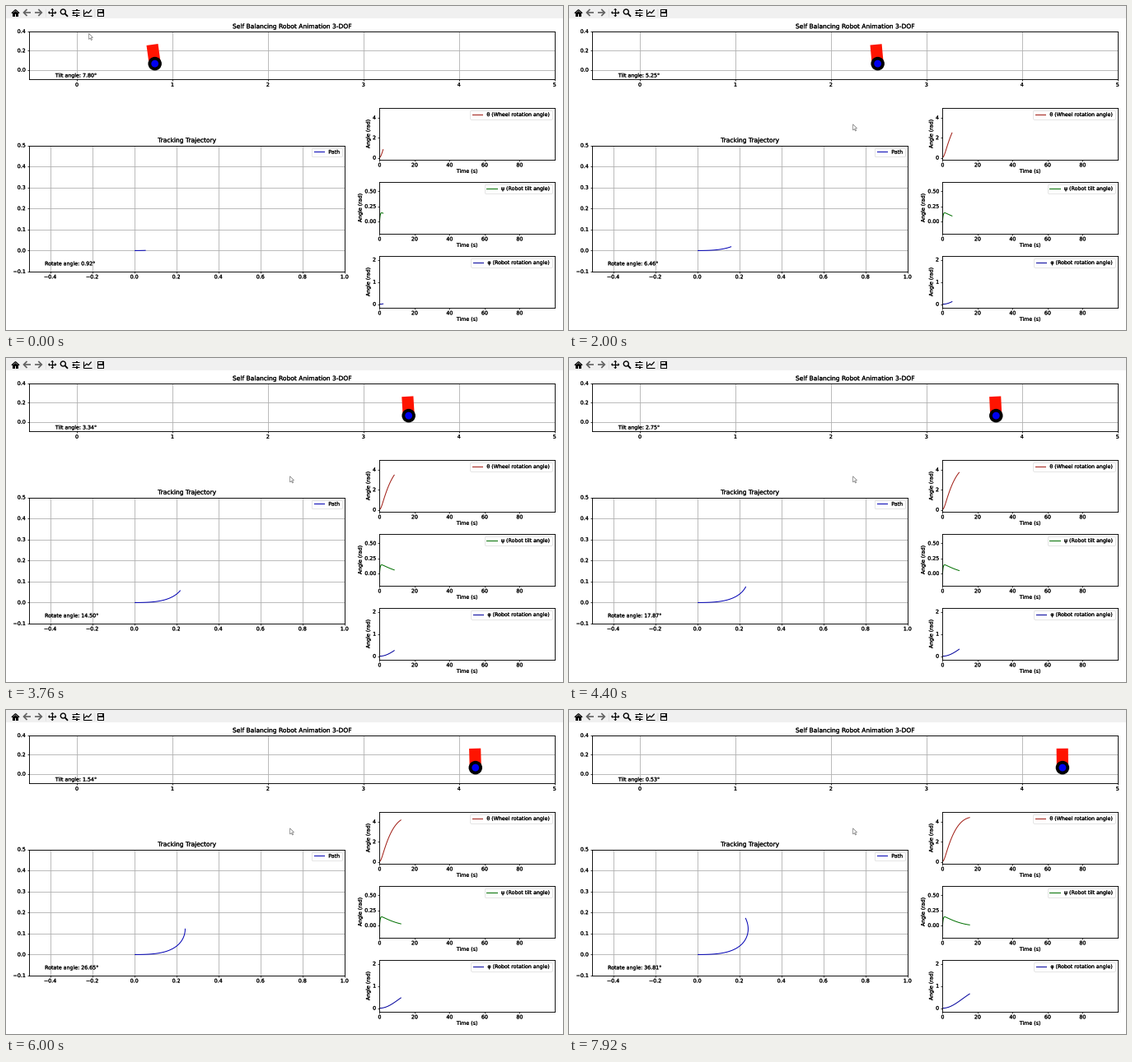
These frames come from a looping animation (676x394 px, 8 s). A matplotlib script:

```python
import numpy as np
import matplotlib.pyplot as plt
from matplotlib.animation import FuncAnimation
from matplotlib.patches import Circle, Polygon, Rectangle
from matplotlib.patheffects import withStroke
from matplotlib.text import Text

W, H = 676, 394
FRAMES, INTERVAL = 100, 80
SCALE = 0.452  # shrinks the default matplotlib style to the stage
WHEEL_R = 0.065
BODY_W, BODY_H = 0.122, 0.2

plt.rcParams.update({
    "font.family": "DejaVu Sans",
    "font.size": 10 * SCALE,
    "axes.titlesize": 12 * SCALE,
    "axes.titlepad": 6 * SCALE,
    "axes.labelpad": 4 * SCALE,
    "axes.linewidth": 0.65,
    "grid.linewidth": 0.6,
    "lines.linewidth": 0.72,
    "patch.linewidth": SCALE,
    "legend.fontsize": 10 * SCALE,
    "toolbar": "None",
})
for axis in ("xtick", "ytick"):
    plt.rcParams.update({
        f"{axis}.major.size": 3.5 * SCALE,
        f"{axis}.major.width": 0.55,
        f"{axis}.major.pad": 3.5 * SCALE,
    })

fig = plt.figure(figsize=(W / 100, H / 100), dpi=100, facecolor="white")


# --- motion -----------------------------------------------------------------
T0, DT = 2.0, 0.1357       # plot time at the loop start and per frame
DECAY, OMEGA = 0.0138, 0.01313  # damped swing, per frame

LEAD = 15                  # samples drawn before the loop starts
step = np.concatenate([np.linspace(-T0 / DT, 0, LEAD, endpoint=False),
                       np.arange(FRAMES)])
time = T0 + DT * step
damp = np.exp(-DECAY * step)
cos, sin = np.cos(OMEGA * step), np.sin(OMEGA * step)

# The wheel speed follows the tilt, so theta uses the integral of the swing.
travel = (DECAY + damp * (OMEGA * sin - DECAY * cos)) / (DECAY**2 + OMEGA**2)
tilt = 7.825 * damp * cos * (1 - np.exp(-time / 0.35))
theta = 0.78 + 0.0822 * travel + 0.64 * np.exp(-time / 0.7)
turn = 0.232 * time**2 / (1 + 0.215 * (time / 10.68)**2.3)

path_x = WHEEL_R * theta * np.cos(np.radians(turn))
path_y = WHEEL_R * theta * np.sin(np.radians(turn))


# --- plots ------------------------------------------------------------------
def pixel_axes(left, top, right, bottom, xlim, ylim):
    ax = fig.add_axes([left / W, 1 - bottom / H,
                       (right - left) / W, (bottom - top) / H])
    ax.set(xlim=xlim, ylim=ylim)
    return ax


def angle_plot(top, ylim, yticks, color, label):
    ax = pixel_axes(453.4, top, 665.7, top + 63, (0, 100), ylim)
    ax.set(xticks=range(0, 81, 20), yticks=yticks,
           xlabel="Time (s)", ylabel="Angle (rad)")
    line, = ax.plot([], [], color=color, label=label)
    ax.legend(loc="upper right")
    return line


side = pixel_axes(28, 31, 665.7, 89.4, (-0.5, 5), (-0.1, 0.4))
side.set(xticks=range(6), yticks=[0, 0.2, 0.4],
         title="Self Balancing Robot Animation 3-DOF")
side.grid(True)
tilt_text = side.text(0.05, 0.05, "", transform=side.transAxes)

body = Polygon(np.zeros((4, 2)), color="#ff1400", lw=0, zorder=3)
tire = Circle((0, WHEEL_R), 0.071, color="black", lw=0, zorder=4)
hub = Circle((0, WHEEL_R), 0.038, color="#0000f0", lw=0, zorder=5)
for part in (body, tire, hub):
    side.add_patch(part)

track = pixel_axes(28, 169.5, 410.7, 323, (-0.5, 1), (-0.1, 0.5))
track.set(xticks=np.arange(-4, 11, 2) / 10, yticks=np.arange(-1, 6) / 10,
          title="Tracking Trajectory")
track.grid(True)
path_line, = track.plot([], [], color="#0000b4", label="Path")
track.legend(loc="upper right")
turn_text = track.text(0.05, 0.05, "", transform=track.transAxes)

theta_line = angle_plot(124, (-0.2, 4.98), [0, 2, 4], "#a01c14",
                        "θ (Wheel rotation angle)")
tilt_line = angle_plot(214, (-0.205, 0.656), [0, 0.25, 0.5], "#007000",
                       "ψ (Robot tilt angle)")
turn_line = angle_plot(304, (-0.163, 2.167), [0, 1, 2], "#00009c",
                       "φ (Robot rotation angle)")

# Outline rendering keeps the small text at its exact subpixel size.
for text in fig.findobj(Text):
    text.set_path_effects([withStroke(linewidth=0.12, foreground="black")])


# --- toolbar and pointer ----------------------------------------------------
screen = fig.add_axes([0, 0, 1, 1], zorder=10)
screen.set(xlim=(0, W), ylim=(H, 0))
screen.axis("off")


def stroke(points, color="black", lw=0.9):
    screen.plot(*zip(*points), color=color, lw=lw,
                solid_capstyle="butt", solid_joinstyle="miter")


def fill(points, color="black"):
    screen.add_patch(Polygon(points, color=color, lw=0, zorder=2))


def box(x, y, w, h, color="black"):
    screen.add_patch(Rectangle((x, y), w, h, color=color, lw=0, zorder=2))


def draw_toolbar():
    box(0, 0, W, 15, "#f0f0f0")
    # home
    stroke([(6.8, 8.8), (11.5, 4.6), (16.2, 8.8)])
    box(8.2, 8, 2.4, 4.6)
    box(12.4, 8, 2.4, 4.6)
    fill([(8.2, 9.8), (8.2, 8.9), (11.5, 6), (14.8, 8.9), (14.8, 9.8)])
    # back and forward
    for x, d in ((25.5, -1), (39.3, 1)):
        stroke([(x - 4.2 * d, 8), (x + 3.6 * d, 8)], "#606060", 1.2)
        stroke([(x, 4), (x + 4 * d, 8), (x, 12)], "#606060", 1.2)
    # pan
    stroke([(52, 8), (60.4, 8)])
    stroke([(56.2, 3.8), (56.2, 12.2)])
    for dx, dy in ((1, 0), (-1, 0), (0, 1), (0, -1)):
        x, y = 56.2 + 3.2 * dx, 8 + 3.2 * dy
        fill([(x + 2 * dx, y + 2 * dy), (x + 2 * dy, y + 2 * dx),
              (x - 2 * dy, y - 2 * dx)])
    # zoom
    screen.add_patch(Circle((69.3, 7), 3, fill=False, ec="black", lw=1,
                            zorder=2))
    stroke([(71.4, 9.1), (75, 12.8)], lw=1.3)
    # sliders
    for y, knob in ((5, 86), (8.2, 82), (11.4, 86)):
        stroke([(79.8, y), (89, y)], lw=0.7)
        box(knob - 0.8, y - 1.4, 1.6, 2.8)
    # chart
    stroke([(94.2, 3.8), (94.2, 12.2), (104, 12.2)], lw=0.8)
    stroke([(95.2, 10), (98, 7), (100, 8.8), (103.6, 4.6)])
    # save
    box(110.8, 4, 8.6, 8.6)
    box(112, 5, 4.8, 2.1, "#f0f0f0")
    box(112.2, 8.6, 5.8, 3.1, "#f0f0f0")
    for x in (47.5, 107):
        stroke([(x, 3), (x, 13)], "#dcdcdc", 0.5)


draw_toolbar()
ARROW = np.array([(0, 0), (0, 7.2), (1.7, 5.7), (2.9, 8.2),
                  (4, 7.7), (2.8, 5.3), (4.9, 5.1)])
pointer = Polygon(ARROW, fc="white", ec="#686868", lw=0.45, zorder=3)
screen.add_patch(pointer)
POINTER_FROM, POINTER_TO = np.array([100.5, 33.3]), np.array([344.6, 143.8])


def update(n):
    i = LEAD + n
    x, lean = theta[i], np.radians(tilt[i])

    up = np.array([-np.sin(lean), np.cos(lean)])
    across = np.array([np.cos(lean), np.sin(lean)]) * BODY_W / 2
    base = np.array([x, WHEEL_R])
    top = base + BODY_H * up
    body.set_xy([base - across, base + across, top + across, top - across])
    tire.center = hub.center = (x, WHEEL_R)

    tilt_text.set_text(f"Tilt angle: {tilt[i]:.2f}°")
    turn_text.set_text(f"Rotate angle: {turn[i]:.2f}°")

    past = slice(0, i + 1)
    path_line.set_data(path_x[past], path_y[past])
    theta_line.set_data(time[past], theta[past])
    tilt_line.set_data(time[past], np.radians(tilt[past]))
    turn_line.set_data(time[past], np.radians(turn[past]))

    u = min(n / 11, 1)
    ease = u * u * (3 - 2 * u)
    pointer.set_xy(ARROW + POINTER_FROM + ease * (POINTER_TO - POINTER_FROM))
    return []


anim = FuncAnimation(fig, update, frames=FRAMES, interval=INTERVAL,
                     init_func=lambda: update(0), repeat=True, repeat_delay=0)
plt.show()
```
